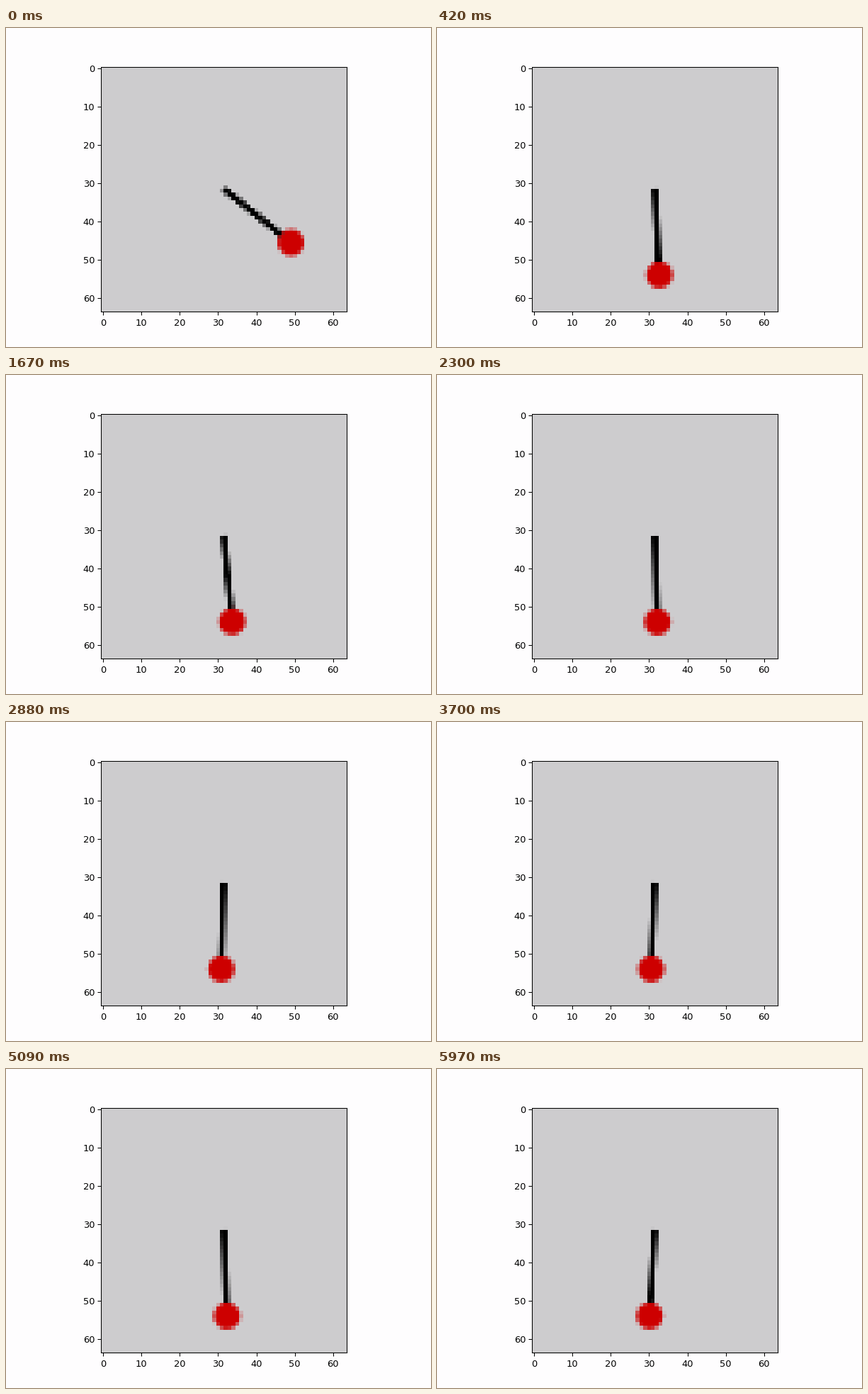
Write a matplotlib script that moves like this. It is 600 px wide and 450 px high and loops after 6 s.

```python
import numpy as np
import matplotlib.pyplot as plt
from matplotlib.animation import FuncAnimation

FRAMES, STEP = 200, 30            # 6000 ms loop
SIZE, PIVOT, LENGTH, RADIUS = 64, 32.0, 22.45, 3.45
START = np.radians(51.3)
GREY = np.array([205, 204, 206]) / 255
RED = np.array([205, 0, 0]) / 255
BLACK = np.zeros(3)

# sideways drift of the bob, in cells, at a few times in seconds
TIMES = [0.40, 0.97, 1.67, 2.88, 3.70, 5.09, 5.97]
DRIFT = [0.0, -0.9, 2.0, -0.65, -1.05, 0.7, -1.3]
SWAY = 1.5

# cell centres relative to the pivot
ys, xs = np.mgrid[:SIZE, :SIZE] + 0.5 - PIVOT


def drift(t):
    """Run from key to key, swaying left then right once on the way."""
    phase = np.interp(t, TIMES, range(len(TIMES)))
    return np.interp(t, TIMES, DRIFT) - SWAY * np.sin(2 * np.pi * phase)


def angle(t):
    fall = START * (1 + 10 * t) * np.exp(-10 * t)
    return fall + np.arcsin(drift(t) / LENGTH)


def blend(img, color, alpha):
    a = np.clip(alpha, 0, 1)[..., None]
    return img * (1 - a) + color * a


def render(theta):
    ux, uy = np.sin(theta), np.cos(theta)
    along = xs * ux + ys * uy
    across = np.abs(xs * uy - ys * ux)
    caps = np.clip(along + 0.5, 0, 1) * np.clip(LENGTH - along, 0, 1)
    rod = np.clip(1.8 - 1.6 * across, 0, 1) * caps
    bob = RADIUS + 0.5 - np.hypot(xs - LENGTH * ux, ys - LENGTH * uy)
    img = np.broadcast_to(GREY, (SIZE, SIZE, 3))
    return blend(blend(img, BLACK, rod), RED, bob)


# 600 x 450 pixels
fig = plt.figure(figsize=(6.4, 4.8), dpi=93.75, facecolor="#fefdfe")
left, top, right, bottom = 134.25, 54.6, 480.75, 400.4
ax = fig.add_axes([left / 600, 1 - bottom / 450,
                   (right - left) / 600, (bottom - top) / 450])
picture = ax.imshow(render(angle(0)), interpolation="nearest", aspect="auto")
ax.set_xticks(range(0, SIZE, 10))
ax.set_yticks(range(0, SIZE, 10))


def update(i):
    picture.set_data(render(angle(i * STEP / 1000)))
    return [picture]


anim = FuncAnimation(fig, update, frames=FRAMES, interval=STEP,
                     repeat=True, repeat_delay=0, blit=False)
plt.show()
```
